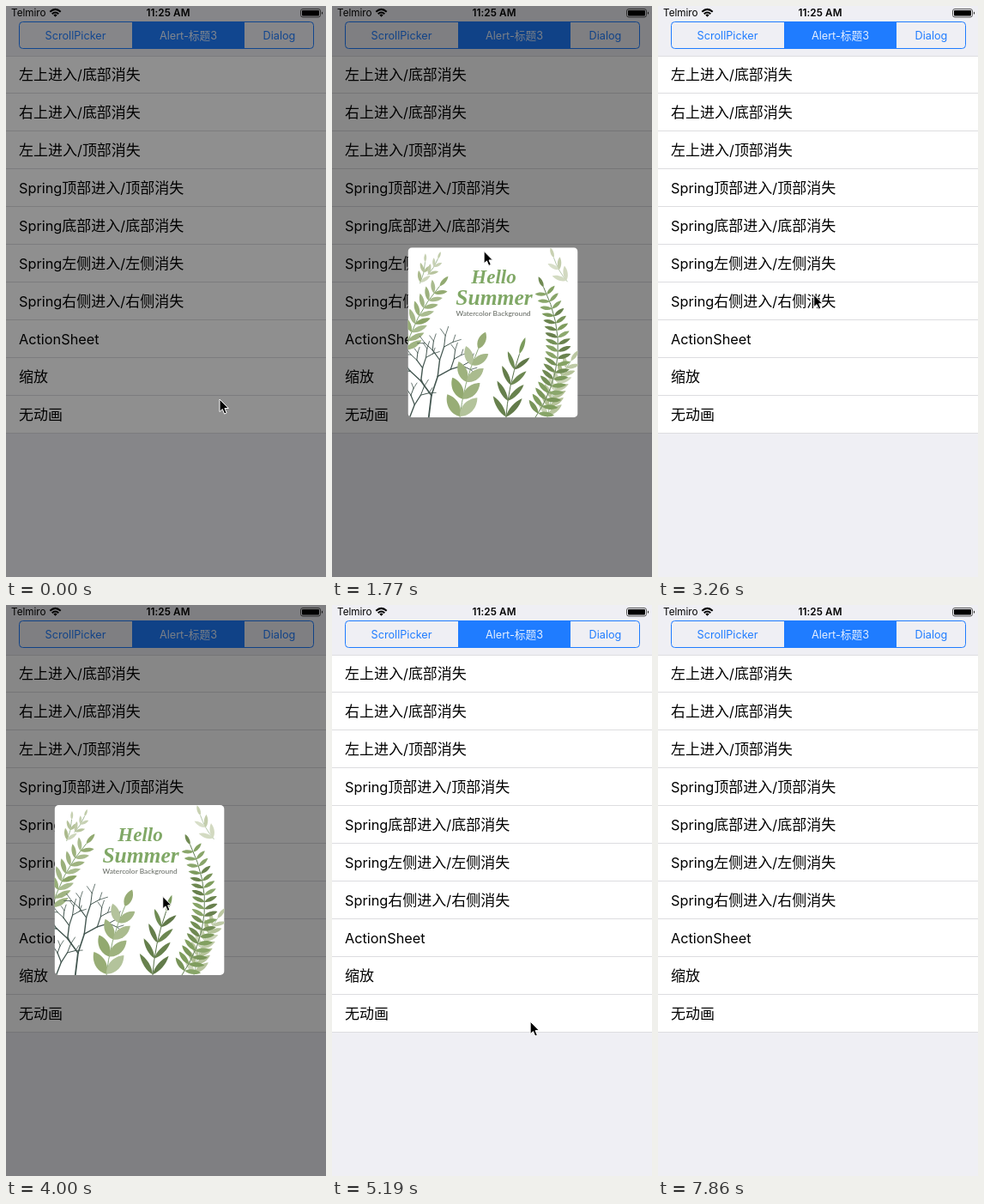
Recreate the animation shown at these times as an HTML page. Size 373 by 665 pixels, loop 8.3 s.

```html
<!DOCTYPE html>
<html lang="zh-CN">
<head>
<meta charset="utf-8">
<title>Alert demo</title>
<style>
html, body { margin: 0; width: 100%; height: 100%; overflow: hidden; background: #efeff4; }
svg { display: block; }
text { font: 17px Inter, "Noto Sans CJK SC", "Noto Sans CJK JP", "Noto Sans CJK", sans-serif; }
.latin { font-size: 16.3px; }
.tab { font-size: 12.7px; text-anchor: middle; fill: #1f7cff; }
.tab.on { fill: #e4efff; }
.status { font-size: 11.7px; }
.clock { font-weight: 600; text-anchor: middle; letter-spacing: .1px; }
.title { font: italic bold 25.5px "Liberation Serif", serif; fill: #80a866; text-anchor: middle; }
.sub { font: 500 8.4px Lato, sans-serif; fill: #6b7069; text-anchor: middle; }
</style>
</head>
<body>
<svg width="373" height="665" viewBox="0 0 373 665">
  <rect width="373" height="665" fill="#efeff4"/>
  <text class="status" x="6" y="12">Telmiro</text>
  <path d="M51.3 6.7Q57.5 1 63.7 6.7M53.7 9.2Q57.5 5.7 61.3 9.2" fill="none" stroke="#000" stroke-width="2"/>
  <path d="M57.5 12.8L55.3 10.4Q57.5 8.6 59.7 10.4Z"/>
  <text class="status clock" x="189" y="12">11:25 AM</text>
  <rect x="343.5" y="3.5" width="23" height="9.5" rx="2.5" fill="none" stroke="#555"/>
  <rect x="345" y="5" width="20" height="6.5" rx="1"/>
  <path d="M368 6.500q2 1.700 0 3.500z"/>
  <rect x="15.500" y="18.500" width="343" height="31" rx="4" fill="none" stroke="#1f7cff"/>
  <path d="M147 18h131v32h-131z" fill="#1f7cff"/>
  <text class="tab" x="81" y="38.500">ScrollPicker</text>
  <text class="tab on" x="212.500" y="38.500">Alert-标题3</text>
  <text class="tab" x="318.500" y="38.500">Dialog</text>
  <g id="list"></g>
  <rect id="dim" width="373" height="665"/>
  <g id="popup">
    <clipPath id="card"><rect width="198" height="198" rx="5"/></clipPath>
    <g clip-path="url(#card)">
      <rect width="198" height="198" fill="#fff"/>
      <g id="plants"></g>
      <text class="title" x="100" y="42" style="font-size:23px">Hello</text>
      <text class="title" x="100.500" y="67">Summer</text>
      <text class="sub" x="99.500" y="80">Watercolor Background</text>
    </g>
  </g>
  <path id="cursor" d="M0 0V14.500L3.300 11.500L5.600 17L8.200 15.900L5.900 10.500H10.300Z" stroke="#fff"/>
</svg>
<script>
const $ = id => document.getElementById(id);
const rowTop = i => 58 + 44 * i;

const sides = ['顶部', '底部', '左侧', '右侧'];
const rows = ['左上进入/底部消失', '右上进入/底部消失', '左上进入/顶部消失',
  ...sides.map(side => `Spring${side}进入/${side}消失`), 'ActionSheet', '缩放', '无动画'];
const rule = y => `<path d="M0 ${y}h373" stroke="#dddde0"/>`;
$('list').innerHTML = '<path d="M0 58h373v440H0z" fill="#fff"/>' + rule(58.5) + rows.map((row, i) => {
  const label = row.replace(/[\x20-\x7e]+/g, '<tspan class="latin">$&</tspan>');
  return `<text x="15" y="${rowTop(i) + 28}">${label}</text>` + rule(rowTop(i + 1) - .5);
}).join('');

let seed = 7;
const random = () => (seed = seed * 16807 % 2147483647) / 2147483647;

function leaf(x, y, angle, len, w, light) {
  const color = `hsl(${105 - light * .35} 25% ${light + 16 * (random() - .5)}%)`;
  return `<path transform="translate(${x} ${y}) rotate(${angle})" fill="${color}"
    d="M0 0C${len * .25} ${-w} ${len * .7} ${-w} ${len} 0C${len * .7} ${w} ${len * .25} ${w} 0 0"/>`;
}

// A bent stem with pairs of leaves; more pairs make them smaller and more open.
function frond(x0, y0, x1, y1, bend, pairs, light, fat = .2) {
  const dx = x1 - x0, dy = y1 - y0, height = Math.hypot(dx, dy);
  const cx = x0 + dx / 2 - dy * bend, cy = y0 + dy / 2 + dx * bend;
  const length = Math.min(6.5 * Math.sqrt(height / pairs), height * .55);
  const spread = 28 + 2.1 * pairs;
  let out = `<path d="M${x0} ${y0}Q${cx} ${cy} ${x1} ${y1}" fill="none" stroke="hsl(100 20% ${light - 5}%)"/>`;
  for (let i = 0; i <= pairs; i++) {
    const t = .06 + .94 * i / pairs, s = 1 - t;
    const x = s * s * x0 + 2 * s * t * cx + t * t * x1;
    const y = s * s * y0 + 2 * s * t * cy + t * t * y1;
    const dir = Math.atan2(s * (cy - y0) + t * (y1 - cy), s * (cx - x0) + t * (x1 - cx)) * 180 / Math.PI;
    const len = length * (1 - .3 * t);
    for (const turn of i < pairs ? [-spread, spread] : [0])
      out += leaf(x, y, dir + turn, len, len * fat, light);
  }
  return out;
}

// Each joint carries on almost straight and sends out one branch, left and right in turn.
function twig(x, y, angle, len, depth, side = 1) {
  const ex = x + len * Math.cos(angle), ey = y + len * Math.sin(angle);
  const line = `<path d="M${x} ${y}L${ex} ${ey}" stroke="#435650" stroke-width="${.8 + .2 * depth}" stroke-linecap="round"/>`;
  return depth ? line + twig(ex, ey, angle + .2 * side, len * .83, depth - 1, -side)
    + twig(ex, ey, angle - .75 * side, len * .74, depth - 1, -side) : line;
}

$('plants').innerHTML =
  frond(14, 42, 20, 17, .1, 2, 72) + frond(23, 32, 35, 13, .1, 2, 72) + frond(186, 40, 170, 12, -.1, 2, 78) +
  frond(-4, 124, 37, 45, -.12, 8, 58) +
  frond(162, 200, 190, 132, -.12, 7, 72) +
  twig(24, 200, -1.45, 28, 5) + twig(2, 198, -1.2, 16, 3) +
  frond(60, 202, 82, 118, -.08, 4, 62, .28) +
  frond(114, 202, 130, 124, -.07, 4, 42, .15) +
  frond(146, 202, 158, 46, .29, 18, 47);

// Times in ticks, `from` is the offset at which the card starts, `away` the point clicked to dismiss it.
const TICKS = 56, LOOP = 8300;
const alerts = [
  { enter: -9, exit: 0, row: 3, from: [0, -432], away: [249, 458] },
  { enter: 10, exit: 18, row: 4, from: [0, 432], away: [237, 495] },
  { enter: 26, exit: 33, row: 5, from: [-286, 0], away: [242, 510] },
  { enter: 42, exit: 48, row: 6, from: [285, 0], away: [229, 521] },
];
// The pointer taps a row, then goes to the dismiss point and rests there until the click.
const stops = alerts.flatMap(({ enter, exit, row, away }) => {
  const tap = [167, rowTop(row) + 16];
  return [[enter - 2, tap], [enter - 1, tap], [exit - 2, away], [exit, away]];
}).concat([[53, [390, 590]], [TICKS, [390, 590]]]);

const spring = t => 1 - Math.exp(-1.5 * t) * (Math.cos(1.075 * t) + 1.395 * Math.sin(1.075 * t));
const ease = u => u * u * u * (10 - 15 * u + 6 * u * u);
const move = (el, x, y) => el.setAttribute('transform', `translate(${x} ${y})`);

function draw(k) {
  const { enter, exit, from } = alerts.findLast(a => a.enter <= k);
  const open = k < exit, age = k - enter + .6, rest = 1 - spring(age);
  $('dim').setAttribute('opacity', open ? .5 * Math.min(1, age / 1.7) : Math.max(0, .44 - .32 * (k - exit)));
  $('popup').setAttribute('visibility', open ? 'visible' : 'hidden');
  move($('popup'), 88.5 + from[0] * rest, 233 + from[1] * rest);

  const next = stops.findIndex(stop => stop[0] > k);
  const [t0, a] = stops[next - 1], [t1, b] = stops[next];
  const e = ease((k - t0) / (t1 - t0));
  move($('cursor'), a[0] + (b[0] - a[0]) * e, a[1] + (b[1] - a[1]) * e);
}

function frame(now) {
  draw(Math.min(TICKS - 1, Math.floor((now % LOOP + 6) / LOOP * TICKS)));
  requestAnimationFrame(frame);
}
draw(0);
requestAnimationFrame(frame);
</script>
</body>
</html>
```
